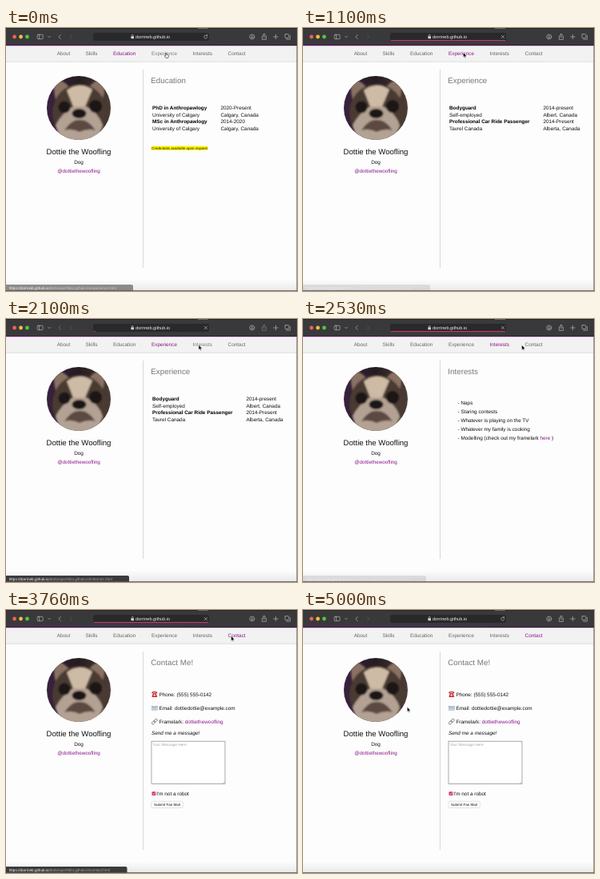
Animation of 364x329 px, one loop 5030 ms. Source, as an HTML page:

```html
<!DOCTYPE html>
<html lang="en">
<head>
<meta charset="utf-8">
<title>Portfolio walkthrough</title>
<style>
  html, body { margin: 0; width: 100%; height: 100%; overflow: hidden; background: #fdfdfd; }
  svg { display: block; width: 364px; height: 329px; }
  text { font-family: "Liberation Sans", Arial, sans-serif; font-size: 6.4px; fill: #111; text-rendering: geometricPrecision; white-space: pre; }
  .b { font-weight: 700; fill: #000; }
  .i { font-style: italic; }
  .mid { text-anchor: middle; }
  .link { fill: #8a1589; }
  .head { font-size: 9.8px; fill: #777; }
  .nav text { fill: #666; text-anchor: middle; }
  .icon { fill: none; stroke: #b4b4b6; stroke-width: .7; stroke-linecap: round; stroke-linejoin: round; }
</style>
</head>
<body>
<svg viewBox="0 0 364 329">
  <defs>
    <clipPath id="round"><circle cx="91" cy="100" r="40"/></clipPath>
    <filter id="soft"><feGaussianBlur stdDeviation="1.3"/></filter>
    <linearGradient id="room" x2="1">
      <stop offset="0" stop-color="#3a2140"/><stop offset=".5" stop-color="#241c20"/><stop offset="1" stop-color="#4d3d36"/>
    </linearGradient>
    <linearGradient id="tint" x2="1">
      <stop offset="0" stop-color="#57105f"/><stop offset="1" stop-color="#3b1840"/>
    </linearGradient>
    <linearGradient id="shade" x2="0" y2="1">
      <stop offset="0" stop-opacity="0"/><stop offset="1" stop-opacity=".08"/>
    </linearGradient>
  </defs>

  <rect width="364" height="329" fill="#fdfdfd"/>

  <!-- browser toolbar -->
  <rect width="364" height="22" fill="#39393b"/>
  <rect width="364" height=".8" fill="#232325"/>
  <rect x="240" width="13" height=".8" fill="#77777a"/>
  <circle cx="10.6" cy="11" r="2.4" fill="#f3605a"/>
  <circle cx="18.6" cy="11" r="2.4" fill="#f5bd40"/>
  <circle cx="26.5" cy="11" r="2.4" fill="#55c546"/>
  <g class="icon">
    <rect x="39.2" y="8.3" width="7" height="5.4" rx="1"/>
    <path d="M41.7 8.3v5.4M52.8 10.4l1.3 1.3 1.3-1.3"/>
    <path class="dim" d="M68.3 8.5l-2.5 2.5 2.5 2.5"/>
    <path d="M80.2 8.5l2.5 2.5-2.5 2.5" stroke="#5c5c5e"/>
    <circle cx="307.8" cy="11" r="3"/>
    <path d="M307.8 9.2v3.4m-1.2-1.2l1.2 1.2 1.2-1.2"/>
    <path class="dim" d="M321.6 10h-1.2v4.4h5V10h-1.2M322.9 12V7.2m-1.4 1.3l1.4-1.4 1.4 1.4"/>
    <path d="M337.4 8.2v5.6m-2.8-2.8h5.6"/>
    <rect x="349" y="7.7" width="4.8" height="4.8" rx=".8"/>
    <path d="M355.4 9.4v4.8h-4.8"/>
  </g>
  <rect x="109" y="6" width="145" height="10" rx="2.6" fill="#29292b"/>
  <rect id="bar" x="110" y="15" height="1.1" fill="#c9366a"/>
  <rect x="156.4" y="10.3" width="3.6" height="3" rx=".5" fill="#d5d5d6"/>
  <path class="icon" d="M157.2 10.3v-1a1 1 0 0 1 2 0v1"/>
  <text x="162" y="13" style="font-size:5.6px;fill:#f0f0f1">dorrineb.github.io</text>
  <path id="reload" class="icon" d="M251.3 9.6a2.1 2.1 0 1 0 .6 1.6M250 9.7h1.5V8.2"/>
  <path id="stop" class="icon" d="M248.2 9.3l3.4 3.4m0-3.4l-3.4 3.4"/>

  <!-- site navigation -->
  <rect y="22" width="364" height="20" fill="#f2f2f2"/>
  <rect y="21" width="364" height="1.2" fill="url(#tint)"/>
  <rect y="41.8" width="364" height=".8" fill="#d6d6d6"/>
  <g class="nav" id="nav"></g>

  <!-- profile -->
  <g clip-path="url(#round)">
    <rect x="51" y="60" width="80" height="80" fill="url(#room)"/>
    <g filter="url(#soft)">
      <path d="M62 90Q57 68 65 64Q76 68 82 78zM102 76Q111 64 120 65Q126 75 120 92z" fill="#8a7264"/>
      <ellipse cx="92" cy="106" rx="34" ry="36" fill="#4a3a30"/>
      <path d="M76 78Q92 66 108 77L99 98Q92 101 84 98z" fill="#cdbba6"/>
      <path d="M62 122Q70 106 84 98H100Q116 106 121 122Q114 145 91 145Q68 145 62 122z" fill="#b3a293"/>
      <path d="M73 128Q82 114 92 115Q103 114 112 128Q103 125 92 130Q82 125 73 128z" fill="#5b4a42"/>
      <circle cx="73" cy="99" r="7.5" fill="#1a1414"/>
      <circle cx="112" cy="98" r="8" fill="#1a1414"/>
      <ellipse cx="91.5" cy="107" rx="9" ry="6" fill="#1d1718"/>
    </g>
  </g>
  <text class="mid" x="91" y="157.8" style="font-size:9.6px">Dottie the Woofling</text>
  <text class="mid" x="91" y="170">Dog</text>
  <text class="mid link" x="91" y="180.8" style="font-size:6.3px">@dottiethewoofling</text>
  <rect x="171" y="52" width=".8" height="248" fill="#cfcfcf"/>

  <g id="pages"></g>

  <rect y="314" width="364" height="15" fill="url(#shade)"/>
  <g id="status">
    <path id="plate" fill="#3b3b3d"/>
    <text x="3.7" y="326.6" style="font-size:4.65px;fill:#a9a9ab"><tspan fill="#fff">https://dorrineb.github.io</tspan><tspan id="path"></tspan></text>
  </g>

  <!-- window edge -->
  <rect x="363.2" y="22" width=".8" height="307" fill="#8e8e90"/>
  <rect y="328.2" width="364" height=".8" fill="#58585a"/>

  <g id="cursor">
    <path id="arrow" d="M0 0V6.1L1.45 4.8 2.4 7 3.4 6.6 2.5 4.4H4.4z" fill="#000" stroke="#fff" stroke-width=".5"/>
    <path id="hand" transform="scale(.85)" d="M-.7 .5Q0-.5 .7 .5V2.7Q1.5 2.2 1.9 2.9 2.7 2.5 3 3.2 4 3 4 4V5.4Q3.7 7.4 2.6 7.6H.1Q-1.3 6.1-2.2 4.5-1.8 3.6-.7 4.6z" fill="#eee" stroke="#222" stroke-width=".7"/>
  </g>
</svg>
<script>
const LOOP = 5030;
const $ = id => document.getElementById(id);
const text = (x, mid, str, cls = '', style = '') =>
  `<text x="${x}" y="${mid + 2.3}" class="${cls}" style="${style}">${str}</text>`;
const head = str => `<text x="181.3" y="68.8" class="head">${str}</text>`;

const table = (col, rows) => rows.map(([a, b], i) => {
  const y = 99.6 + i * 8.7;
  return text(183, y, a, i % 2 ? '' : 'b') + text(col, y, b);
}).join('');

const pages = {
  Education: head('Education') + table(268.4, [
    ['PhD in Anthropawlogy', '2020-Present'],
    ['University of Calgary', 'Calgary, Canada'],
    ['MSc in Anthropawlogy', '2014-2020'],
    ['University of Calgary', 'Calgary, Canada']
  ]) + '<rect x="181.8" y="147.6" width="70.2" height="5.2" fill="#fff500"/>' +
    text(182, 149.4, 'Credentials available upon request', 'i', 'font-size:4.55px'),

  Experience: head('Experience') + table(300.4, [
    ['Bodyguard', '2014-present'],
    ['Self-employed', 'Albert, Canada'],
    ['Professional Car Ride Passenger', '2014-Present'],
    ['Tavrel Canada', 'Alberta, Canada']
  ]),

  Interests: head('Interests') + [
    'Naps', 'Staring contests', 'Whatever is playing on the TV', 'Whatever my family is cooking',
    'Modelling (check out my framelark <tspan class="link">here</tspan> )'
  ].map((s, i) => text(193.5, 104.5 + i * 11.1, '- ' + s)).join(''),

  Contact: head('Contact Me!') + `
    <path d="M182.2 104.2q0-2.4 3.6-2.4t3.6 2.4h-1.6l-.3-.9h-3.4l-.3 .9zM183.9 104h3.8l1.5 5h-6.8z" fill="#c92c35"/>
    <circle cx="185.8" cy="106.5" r="1.2" fill="#f4dcdc"/>
    <rect x="182.3" y="120.2" width="7" height="5" fill="#c9d3dc" stroke="#8d99a5" stroke-width=".4"/>
    <path d="M182.4 120.4l3.4 2.6 3.4-2.6" fill="none" stroke="#6d7f92" stroke-width=".5"/>
    <g fill="none" stroke="#777" stroke-width=".9" transform="rotate(-45 185.8 139.6)">
      <rect x="181.6" y="138.2" width="4.7" height="2.8" rx="1.4"/>
      <rect x="185.3" y="138.2" width="4.7" height="2.8" rx="1.4"/>
    </g>` +
    text(191.4, 105.6, 'Phone: (555) 555-0142') +
    text(191.4, 122.7, 'Email: dottiedottie@example.com') +
    text(191.4, 139.5, 'Framelark: <tspan class="link">dottiethewoofling</tspan>') +
    text(182, 154, 'Send me a message!', 'i') + `
    <rect x="182" y="164.2" width="92" height="53.4" fill="#fff" stroke="#858585" stroke-width=".7"/>
    <path d="M273.5 214.6l-2.5 2.5m2.5-1.1l-1.1 1.1" stroke="#888" stroke-width=".4"/>` +
    text(183.4, 167.6, 'Your Message Here', '', 'font-size:4.8px;fill:#a8a8a8') + `
    <rect x="182.5" y="227.3" width="4.8" height="4.8" rx=".9" fill="#cf3760"/>
    <path d="M183.6 229.8l1 1.1 1.7-2.4" fill="none" stroke="#fff" stroke-width=".7"/>` +
    text(188.2, 229.5, "I'm not a robot") + `
    <rect x="181.8" y="239.3" width="39.6" height="8.2" rx="1.8" fill="#fff" stroke="#cfcfcf" stroke-width=".6"/>` +
    text(185, 242.8, 'Submit Fan Mail', '', 'font-size:4.55px')
};

const tabs = { About: 72, Skills: 107, Education: 148.2, Experience: 198, Interests: 245.8, Contact: 288.6 };
$('nav').innerHTML = Object.entries(tabs).map(([n, x]) => `<text id="tab${n}" x="${x}" y="34.2">${n}</text>`).join('');
$('pages').innerHTML = Object.entries(pages).map(([n, s]) => `<g id="page${n}">${s}</g>`).join('');

// click, page swap, load end; status line: appears, starts to fade, gone, width
const FADE_IN = 200;
const visits = [
  { name: 'Experience', click: 600, swap: 950, done: 1250, status: [-110, 960, 1120, 159] },
  { name: 'Interests', click: 2070, swap: 2350, done: 2720, status: [1400, 2390, 2550, 154] },
  { name: 'Contact', click: 3400, swap: 3600, done: 4000, status: [2800, 3800, 3960, 151.5] }
];

// time, x, y of the pointer tip
const track = [
  [0, 200, 31], [950, 200, 31], [1150, 200.5, 30.7], [1470, 241, 32.5], [2360, 241, 32.5],
  [2530, 273.6, 32.6], [2720, 282, 33.6], [3500, 282, 33.6], [3700, 281.6, 32.6],
  [4260, 281.6, 32.6], [4830, 130.3, 121.3], [LOOP, 130.3, 121.3]
];
// spans in which the pointer is a hand over a link
const hands = [[0, 950, 'Experience'], [1400, 2060, 'Interests'], [2640, 3600, 'Contact']];

const show = (el, on) => { el.style.display = on ? '' : 'none'; };
const clamp = v => Math.min(1, Math.max(0, v));
const smooth = v => v * v * (3 - 2 * v);

function pointerAt(t) {
  const i = track.findIndex(k => k[0] > t);
  const [t0, x0, y0] = track[i - 1], [t1, x1, y1] = track[i];
  const p = smooth((t - t0) / (t1 - t0));
  return [x0 + (x1 - x0) * p, y0 + (y1 - y0) * p];
}

function draw(t) {
  const current = visits.filter(v => t >= v.swap).pop()?.name ?? 'Education';
  for (const n in pages) show($('page' + n), n === current);

  const hand = hands.find(h => t >= h[0] && t < h[1]);
  const hovered = hand ? hand[2] : t > 1400 && t < 2350 ? 'Interests' : '';
  for (const n in tabs) $('tab' + n).style.fill = n === current ? '#8a1589' : n === hovered ? '#7c7c7c' : '';

  const load = visits.find(v => t >= v.click && t < v.done);
  show($('stop'), load);
  show($('reload'), !load);
  const part = load ? clamp((t - load.click) / (load.swap - load.click)) : 0;
  $('bar').setAttribute('width', 143 * part * part);
  const dim = load && t < load.swap;
  document.querySelectorAll('.dim').forEach(el => { el.style.stroke = dim ? '#7a7a7c' : ''; });

  const link = visits.find(v => t >= v.status[0] && t < v.status[2]);
  show($('status'), link);
  if (link) {
    const [from, fade, gone, w] = link.status;
    $('status').style.opacity = Math.min(clamp((t - from) / FADE_IN), 1 - clamp((t - fade) / (gone - fade)));
    $('plate').setAttribute('d', `M0 321H${w - 2}q2 0 2 2V329H0z`);
    $('path').textContent = `/dottiesportfolio.github.io/${link.name.toLowerCase()}.html`;
  }

  const [x, y] = pointerAt(t);
  $('cursor').setAttribute('transform', `translate(${x} ${y})`);
  show($('hand'), hand);
  show($('arrow'), !hand);
}

const start = performance.now();
function tick() {
  draw((performance.now() - start) % LOOP);
  requestAnimationFrame(tick);
}
draw(0);
requestAnimationFrame(tick);
</script>
</body>
</html>
```
